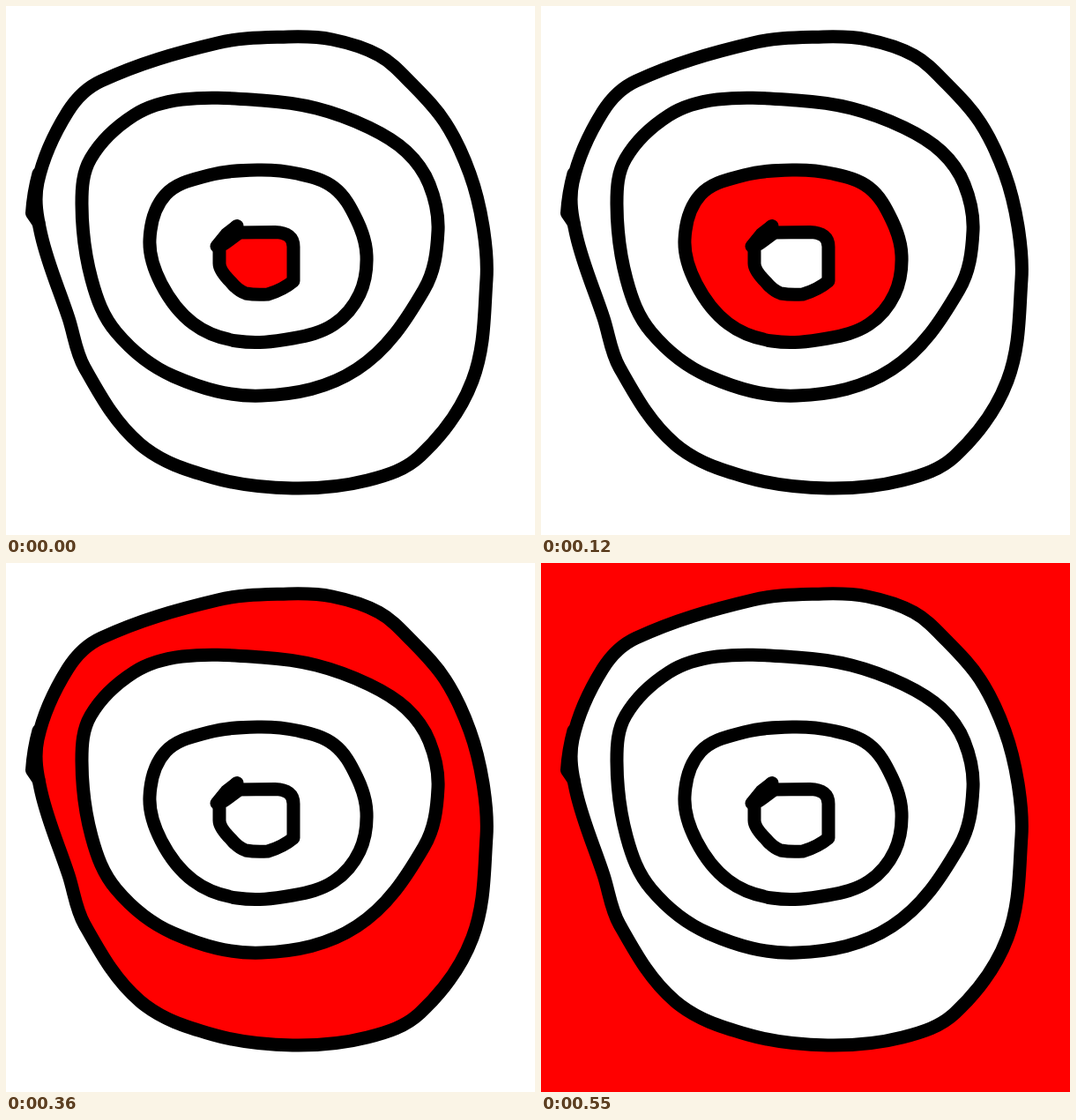
An HTML page that plays this animation: 600x600 px, repeating every 600 ms.

```html
<!DOCTYPE html>
<html lang="en">
<head>
<meta charset="utf-8">
<title>Pulsing rings</title>
<style>
  html, body { margin: 0; width: 100%; height: 100%; overflow: hidden; background: #fff; }
  svg { display: block; width: 100vw; height: 100vh; }
  .ring { stroke: #000; stroke-width: 15; stroke-linecap: round; stroke-linejoin: round; }
  .tail { fill: none; }
</style>
</head>
<body>
<svg viewBox="0 0 600 600">
  <rect class="zone" width="600" height="600"/>
  <path id="outer" class="ring zone"/>
  <path class="ring tail" d="M37 190Q31 212 29.500 235L37 246"/>
  <path id="middle" class="ring zone"/>
  <path id="inner" class="ring zone"/>
  <path class="ring zone" d="M262 257L305 256.500Q326 257 326 273V312Q314 322 297 327Q283 328 272 326Q263 323 255 313Q242 300 242 292V272Z"/>
  <path class="ring tail" d="M239 272.500L250 259L262 249.500M247 270L262 259"/>
</svg>
<script>
const STEP = 120;

// Key points of each hand-drawn ring, clockwise from the top
const rings = {
  outer: '320,35 370,38 423,56 460,88 498,132 526,190 541,250 545,310 529,425 470,510 410,538 325,547 235,535 152,497 89,410 71,354 40,260 36,200 70,120 108,85 240,42',
  middle: '200,106 290,107 352,116 412,138 454,165 480,202 490,255 474,322 398,412 290,442 190,420 125,370 97,310 86,225 96,173 145,124',
  inner: '285,186 330,190 372,206 398,243 409,283 401,327 372,361 325,377 262,380 212,360 176,315 163,265 181,214 230,192'
};

// Closed curve whose handles scale with the distance between points
function smooth(text) {
  const pts = text.split(' ').map(p => p.split(',').map(Number));
  const at = i => pts[(i + pts.length) % pts.length];
  const gap = (a, b) => Math.hypot(b[0] - a[0], b[1] - a[1]);
  const handle = (i, reach) => {
    const prev = at(i - 1), next = at(i + 1), scale = reach / gap(prev, next);
    return at(i).map((v, k) => (v + (next[k] - prev[k]) * scale).toFixed(1));
  };
  return pts.reduce((d, p, i) => {
    const reach = gap(p, at(i + 1)) * 0.35;
    return `${d}C${handle(i, reach)} ${handle(i + 1, -reach)} ${at(i + 1)}`;
  }, 'M' + pts[0]) + 'Z';
}

for (const id in rings) document.getElementById(id).setAttribute('d', smooth(rings[id]));

// Zones from the core outwards
const zones = [...document.querySelectorAll('.zone')].reverse();
const start = performance.now();

function draw(now) {
  const lit = Math.floor(Math.max(0, now - start) / STEP) % zones.length;
  zones.forEach((zone, i) => zone.setAttribute('fill', i === lit ? '#f00' : '#fff'));
  requestAnimationFrame(draw);
}
draw(start);
</script>
</body>
</html>
```
